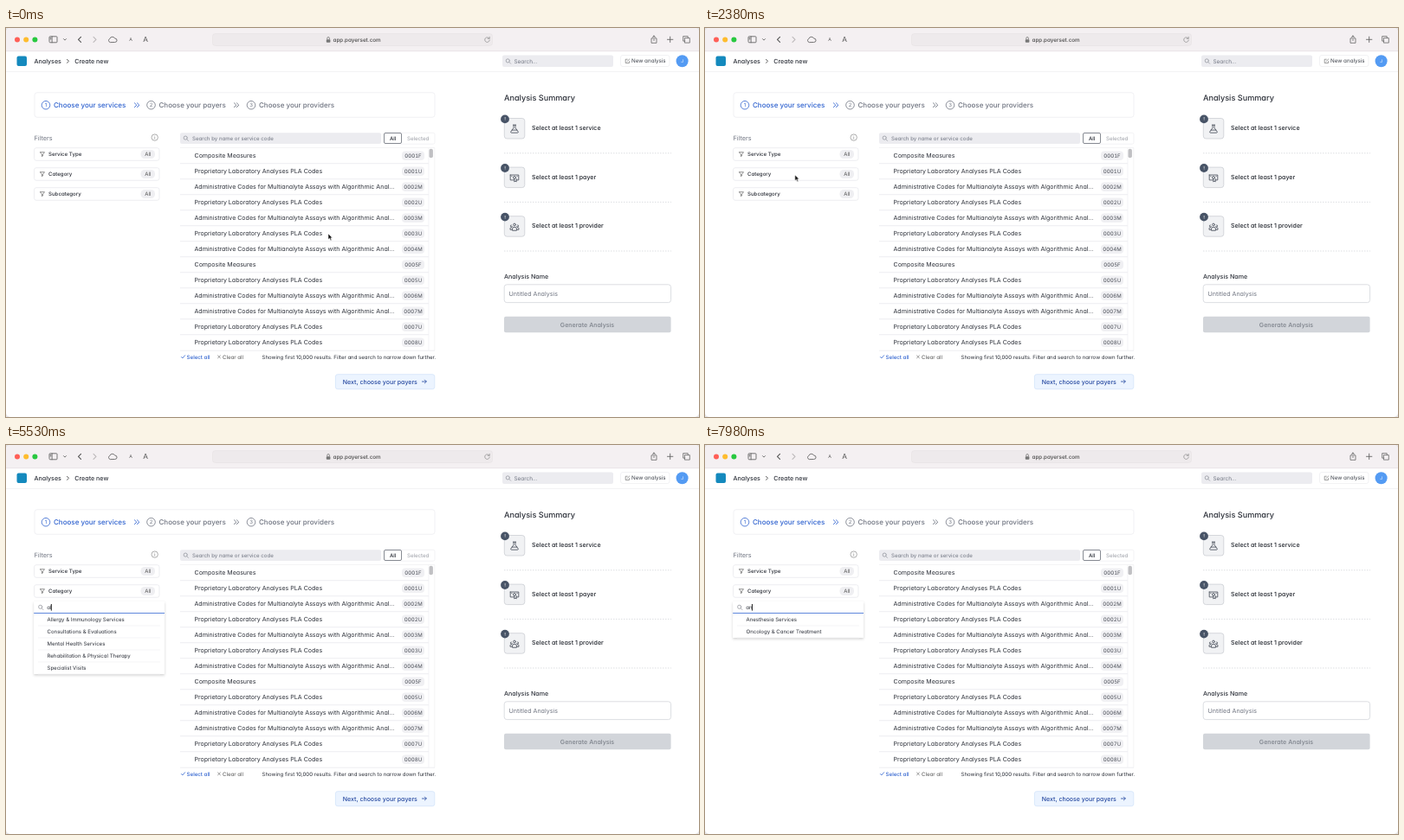
Recreate the animation shown at these times as an HTML page. Size 800 by 450 pixels, loop 8 s.

```html
<!DOCTYPE html>
<html lang="en">
<head>
<meta charset="utf-8">
<title>Create new analysis</title>
<style>
html, body { margin: 0; width: 100%; height: 100%; overflow: hidden; background: #e6e4e5; }
svg { display: block; width: 800px; height: 450px; }
text {
  font-family: Inter, "Open Sans", sans-serif;
  font-feature-settings: "cv11";
  text-rendering: geometricPrecision;
  white-space: pre;
}
.m { font-weight: 500; }
.code { font-feature-settings: "cv11", "tnum"; }
.icon { fill: none; stroke-linecap: round; stroke-linejoin: round; }

#pointer { animation: move 8s infinite; }
#arrow { animation: arrow 8s step-end infinite; }
#beam { animation: beam 8s step-end infinite; }
#hot { opacity: 0; animation: hot 8s step-end infinite; }
#caret { animation: blink 8s linear infinite; }

@keyframes move {
  0%, 13.125% { transform: translate(372px, 238px); animation-timing-function: cubic-bezier(.45, 0, .75, .75); }
  21.875% { transform: translate(210px, 223.5px); animation-timing-function: cubic-bezier(.25, .4, .5, 1); }
  33.25%, 42% { transform: translate(94px, 165px); animation-timing-function: ease-in-out; }
  50.75%, 100% { transform: translate(93px, 189px); }
}
@keyframes arrow { 0% { opacity: 1; } 47.25%, 100% { opacity: 0; } }
@keyframes beam { 0% { opacity: 0; } 47.25% { opacity: 1; } 66.5%, 100% { opacity: 0; } }
@keyframes hot { 0% { opacity: 0; } 13.125% { opacity: 1; } 23.625%, 100% { opacity: 0; } }
@keyframes blink {
  0%, 42% { opacity: 1; }
  45.5%, 47.25% { opacity: 0; }
  50.75%, 57.75% { opacity: 1; }
  61.25%, 63% { opacity: 0; }
  66.5%, 78.75% { opacity: 1; }
  82.25%, 84% { opacity: 0; }
  85%, 100% { opacity: 1; }
}
</style>
</head>
<body>
<svg id="stage" viewBox="0 0 800 450">
  <defs>
    <filter id="shadow" x="-10%" y="-10%" width="120%" height="130%">
      <feDropShadow dx="0" dy="1.5" stdDeviation="1.5" flood-opacity=".18"/>
    </filter>
    <clipPath id="listClip"><rect x="32" y="194" width="151" height="171"/></clipPath>
  </defs>
  <g id="page"></g>
  <g id="menu" display="none">
    <rect id="panel" x="32.2" y="181" width="150.8" fill="#fff" filter="url(#shadow)"/>
    <g id="field"></g>
    <g id="options" clip-path="url(#listClip)"></g>
    <rect id="thumb" x="177.5" y="196.5" width="4.3" height="112" rx="2" fill="#bcbcbe"/>
    <rect id="caret" y="184" width="1" height="7.6" fill="#222"/>
  </g>
  <g id="pointer">
    <path id="arrow" d="M0 0V6.6L1.6 5.2 2.7 7.7 3.9 7.2 2.8 4.8H4.8Z" fill="#111" stroke="#fff" stroke-width=".5"/>
    <path id="beam" class="icon" d="M-1.5-4.5Q0-4.5 0-3.5V3.5Q0 4.5-1.5 4.5M1.5-4.5Q0-4.5 0-3.5M0 3.5Q0 4.5 1.5 4.5" stroke="#222" stroke-width=".9"/>
  </g>
</svg>
<script>
const $ = id => document.getElementById(id);
const INK = '#2b2f38', GRAY = '#6f7480', BLUE = '#2f62cf';
const LINE = '#e6e7eb', PILL = '#f0f0f3';

const esc = s => s.replace(/&/g, '&amp;');
// y is the middle of the capitals
const text = (x, y, s, size, fill = INK, cls = '', anchor = 'start') =>
  `<text x="${x}" y="${y + size * 0.36}" font-size="${size}" fill="${fill}" class="${cls}" text-anchor="${anchor}">${esc(s)}</text>`;
const rect = (x, y, w, h, r, fill, stroke = 'none', extra = '') =>
  `<rect x="${x}" y="${y}" width="${w}" height="${h}" rx="${r}" fill="${fill}" stroke="${stroke}" stroke-width=".7" ${extra}/>`;
const circle = (x, y, r, fill, stroke = 'none') =>
  `<circle cx="${x}" cy="${y}" r="${r}" fill="${fill}" stroke="${stroke}" stroke-width=".8"/>`;
const line = (x1, x2, y, stroke = LINE, dash = '') =>
  `<path d="M${x1} ${y}H${x2}" stroke="${stroke}" stroke-width=".7" stroke-dasharray="${dash}"/>`;
const icon = (x, y, d, stroke = '#666', w = 0.9) =>
  `<path class="icon" transform="translate(${x} ${y})" d="${d}" stroke="${stroke}" stroke-width="${w}"/>`;
const glass = (x, y) => icon(x, y, 'M1.2 1.2L2.8 2.8M1.6-.5A2.1 2.1 0 1 1-2.6-.5A2.1 2.1 0 1 1 1.6-.5', '#8a8d96', 0.7);

function browser() {
  return rect(0, 0, 800, 450, 5, '#fff') +
    '<path d="M0 27V5Q0 0 5 0H795Q800 0 800 5V27Z" fill="#f4f0f2"/>' + line(0, 800, 26.7, '#e4e0e2') +
    circle(13, 13.5, 3, '#ff5f57') + circle(23.2, 13.5, 3, '#febc2e') + circle(33.4, 13.5, 3, '#28c840') +
    icon(54.5, 13.3, 'M-4.5-2.7Q-4.5-3.5-3.7-3.5H3.7Q4.5-3.5 4.5-2.7V2.7Q4.5 3.5 3.7 3.5H-3.7Q-4.5 3.5-4.5 2.7ZM-1.4-3.5V3.5M-3.4-1.8H-2.5M-3.4-.3H-2.5') +
    icon(68, 13.3, 'M-1.5-.7L0 .8 1.5-.7') +
    icon(85, 13.3, 'M1.5-3L-1.5 0 1.5 3', '#555', 1.1) + icon(102.5, 13.3, 'M-1.5-3L1.5 0-1.5 3', '#bdb9bb', 1.1) +
    icon(123, 13.5, 'M-3 3A2.2 2.2 0 0 1-3.2-1.1A3.2 3.2 0 0 1 2.7-1.4A2.2 2.2 0 0 1 3 3Z') +
    text(144, 13.5, 'A', 5.2, '#555', '', 'middle') + text(161, 13.3, 'A', 8.3, '#555', '', 'middle') +
    rect(238.5, 6.5, 323, 14, 3, '#eeeaec', '#e8e4e6') +
    rect(369.8, 13.2, 4.6, 3.6, 0.7, '#777') + icon(372.1, 13, 'M-1.3 0V-1.2A1.3 1.3 0 0 1 1.3-1.2V0', '#777', 0.8) +
    text(377.5, 13.8, 'app.payerset.com', 6.3, '#4a4a4a', 'm') +
    icon(555.5, 13.7, 'M2.4-1.6A2.8 2.8 0 1 0 2.8.4M2.7-3.4V-1.4H.7', '#888', 0.7) +
    icon(748, 13.3, 'M-1.3-1.4H-3V4H3V-1.4H1.3M0 1.3V-4.3M-1.6-2.8L0-4.4 1.6-2.8', '#666', 0.8) +
    icon(766.7, 13.3, 'M-3.2 0H3.2M0-3.2V3.2', '#666', 0.9) +
    icon(785.5, 13.3, 'M-1.7-1.7H3.8V3.8H-1.7ZM-1.7 1.8H-3.8V-3.7H1.7V-1.7', '#666', 0.8);
}

function header() {
  return rect(12.5, 32.5, 11.5, 11.5, 2, '#1489bd') +
    text(32.5, 38.3, 'Analyses', 7.1, INK, 'm') + icon(71.5, 38.3, 'M-1-2L1 0-1 2', '#444', 0.9) +
    text(79.3, 38.3, 'Create new', 7.1, INK, 'm') +
    rect(573, 31.5, 128, 13.5, 2, '#ececf0') + glass(579.8, 38.4) + text(586.5, 38.4, 'Search...', 6.4, GRAY) +
    rect(709.5, 31.5, 56.5, 13, 2.5, '#fff', '#ececef') +
    icon(717.5, 38.2, 'M-.2-2H-2.3V2.3H2V.4M-.6.6L2.4-2.4', '#777', 0.7) +
    text(722, 38.2, 'New analysis', 6.25, '#3d414a') +
    circle(780.6, 38.3, 7, '#549bf3') + text(780.6, 38.3, 'J', 5, '#fff', '', 'middle') +
    line(0, 800, 50.4, '#ececef');
}

function steps() {
  const step = (x, n, label, color) =>
    circle(x, 89.2, 4.8, 'none', color) + text(x, 89.2, String(n), 6, color, '', 'middle') +
    text(x + 9, 89.2, label, 8, color, 'm');
  const arrows = (x, color) => icon(x, 89.2, 'M-2.6-2.4L-.2 0-2.6 2.4M.4-2.4L2.8 0 .4 2.4', color, 0.9);
  return rect(33, 74.7, 462, 28.6, 3, '#fff', '#ebebef') +
    step(46, 1, 'Choose your services', BLUE) + arrows(151, BLUE) +
    step(167.5, 2, 'Choose your payers', GRAY) + arrows(266, GRAY) +
    step(283, 3, 'Choose your providers', GRAY);
}

function filters() {
  const filter = (label, i) => {
    const y = 146 + 23 * i;
    return rect(32.5, y - 7.3, 144.5, 14.6, 2.5, '#fff', LINE) +
      icon(42, y, 'M-2.5-2.3H2.5L.6.2V2L-.6 2.6V.2Z', '#666', 0.7) +
      text(49, y, label, 6.12, INK, 'm') +
      rect(155.5, y - 5, 16.5, 10, 4.5, '#efeff2') + text(163.8, y, 'All', 6.1, '#555', '', 'middle');
  };
  return text(32.5, 127.5, 'Filters', 7.3, GRAY) + circle(171.7, 126.6, 3.7, 'none', '#999') +
    icon(171.7, 126.6, 'M0-1.6V-1.5M0-.2V1.7', '#888', 0.6) +
    ['Service Type', 'Category', 'Subcategory'].map(filter).join('');
}

function services() {
  const names = {
    F: 'Composite Measures',
    U: 'Proprietary Laboratory Analyses PLA Codes',
    M: 'Administrative Codes for Multianalyte Assays with Algorithmic Anal...'
  };
  const codes = '1F 1U 2M 2U 3M 3U 4M 5F 5U 6M 7M 7U 8U'.split(' ');
  const row = (code, i) => {
    const y = 147.7 + 18 * i;
    return text(217.5, y, names[code[1]], 7.06) +
      rect(457, y - 5.2, 26, 10.4, 4, PILL) +
      (code === '3U' ? rect(457, y - 5.2, 26, 10.4, 4, '#d9dade', 'none', 'id="hot"') : '') +
      text(470, y, '000' + code, 6.1, '#4b4f58', 'code', 'middle') +
      (i < 12 ? line(201, 488, y + 9) : '');
  };
  return rect(201, 121.3, 232, 12.8, 2, '#ececf0') + glass(207.7, 127.6) +
    text(215, 127.6, 'Search by name or service code', 6.1, GRAY) +
    rect(436.6, 121.2, 58.4, 13, 2, '#fff', '#eeeef1') +
    rect(436.5, 121.5, 20, 12, 1.5, '#fff', '#555b66') + text(446.7, 127.5, 'All', 6.1, INK, 'm', 'middle') +
    text(463, 127.6, 'Selected', 6.15, '#9a9da5') +
    line(201, 495, 138.5, '#eeeef1') + codes.map(row).join('') +
    '<path d="M488 139V373M494.8 139V373" stroke="#f0f0f2" stroke-width=".7"/>' +
    rect(488.5, 139.7, 4.4, 10.5, 2, '#c0c0c3') + line(201, 495, 373.2) +
    icon(204.5, 380.4, 'M-2 .2L-.7 1.6 2.1-1.7', BLUE, 0.8) + text(208.6, 380.4, 'Select all', 6.15, BLUE, 'm') +
    icon(246, 380.4, 'M-1.4-1.4L1.4 1.4M1.4-1.4L-1.4 1.4', '#666', 0.7) + text(250, 380.4, 'Clear all', 6.15, '#555') +
    text(295.5, 380.4, 'Showing first 10,000 results. Filter and search to narrow down further.', 6.07) +
    rect(380.4, 400.7, 114.4, 17, 2.5, '#ecf4ff', '#cfe1fa') +
    text(388.8, 409, 'Next, choose your payers', 7, '#24479f', 'm') +
    icon(482.8, 409, 'M-2.4 0H2.4M.6-1.9L2.5 0 .6 1.9', '#24479f', 0.8);
}

function summary() {
  const art = [
    'M-1.6-4.5H1.6M-1-4.5V-1.2L-4.3 3.4Q-4.5 4.5-3.5 4.5H3.5Q4.5 4.5 4.3 3.4L1-1.2V-4.5M-2.9 1.4H2.9',
    'M-4.8-3.3H4.8V2.6H2.5M-.8 2.6H-4.8V-3.3M1.5-.3A1.5 1.5 0 1 1-1.5-.3A1.5 1.5 0 1 1 1.5-.3M-.2 1.5V4.6L1 3.6 2.2 4.6V1.3M-3.2-1.8H-3M3-1.8H3.2',
    'M1.4-2.4A1.4 1.4 0 1 1-1.4-2.4A1.4 1.4 0 1 1 1.4-2.4M-2.4 4V2.2Q-2.4.4 0 .4Q2.4.4 2.4 2.2V4ZM-2.6-.4A1.1 1.1 0 1 1-3.6-2M2.6-.4A1.1 1.1 0 1 0 3.6-2M-2.8 3.4H-5V2Q-5 .7-3.2.7M2.8 3.4H5V2Q5 .7 3.2.7'
  ];
  const item = (name, i) => {
    const y = 116.2 + 56.6 * i;
    return rect(575.3, y - 11.7, 23.5, 23.5, 3, '#f1f2f4', '#c6c9cf') + icon(587, y + 0.5, art[i], '#3f4652', 0.8) +
      circle(576, y - 10.8, 4.9, '#475366') + text(576, y - 10.8, '!', 5.6, '#fff', 'm', 'middle') +
      text(607, y - 0.6, 'Select at least 1 ' + name, 7.05, '#1f232b', 'm') +
      line(575, 768, y + 28.6, '#cfd1d6', '1.5 1.5');
  };
  return text(575, 81.2, 'Analysis Summary', 9.13, INK, 'm') +
    ['service', 'payer', 'provider'].map(item).join('') +
    text(575, 287.3, 'Analysis Name', 7.1, INK, 'm') +
    rect(575.2, 296.8, 192.4, 20.8, 3, '#fff', '#cdd0d6') + text(580.5, 307.2, 'Untitled Analysis', 7.1, GRAY) +
    rect(575, 333.7, 192.6, 18.6, 2, '#d2d5da') + text(671, 343, 'Generate Analysis', 7.1, '#7c818a', 'm', 'middle');
}

$('page').innerHTML = browser() + header() + steps() + filters() + services() + summary();

const categories = [
  'Allergy & Immunology Services', 'Anesthesia Services', 'Cardiovascular Procedures',
  'Consultations & Evaluations', 'Emergency Services', 'Gastroenterology Procedures',
  'Imaging & Radiology', 'Laboratory & Diagnostic Tests', 'Maternity & Obstetrics',
  'Mental Health Services', 'Oncology & Cancer Treatment', 'Optometry & Eye Care',
  'Pediatric Services', 'Rehabilitation & Physical Therapy', 'Specialist Visits'
];
const OPEN = 2870;
const typing = [[OPEN, ''], [5320, 'a'], [5530, 'al'], [5740, 'all'], [6790, 'al'], [7140, 'a'], [7490, 'an']];
let shown = null;

function showQuery(query) {
  if (query === shown) return;
  shown = query;
  $('menu').setAttribute('display', query === null ? 'none' : 'inline');
  if (query === null) return;
  const found = categories.filter(c => c.toLowerCase().includes(query));
  $('panel').setAttribute('height', Math.min(184, 14 + 14 * found.length));
  $('field').innerHTML = glass(40.2, 187.8) + text(47.2, 187.8, query || 'Category', 6.1, query ? INK : GRAY) +
    '<path d="M32.2 194.5H183" stroke="#5f88dc" stroke-width="1"/>';
  $('options').innerHTML = found.map((name, i) =>
    text(47.5, 201.9 + 14 * i, name, 6.07) + line(37, 178, 209 + 14 * i, '#f1f1f4')).join('');
  $('thumb').setAttribute('display', found.length > 12 ? 'inline' : 'none');
  const width = query ? $('field').querySelector('text').getComputedTextLength() : 0;
  $('caret').setAttribute('x', 46.6 + width);
}

let start;
function frame(now) {
  start ??= now;
  const t = (now - start) % 8000;
  const key = typing.filter(([at]) => at <= t).pop();
  showQuery(key ? key[1] : null);
  requestAnimationFrame(frame);
}
requestAnimationFrame(frame);
</script>
</body>
</html>
```
